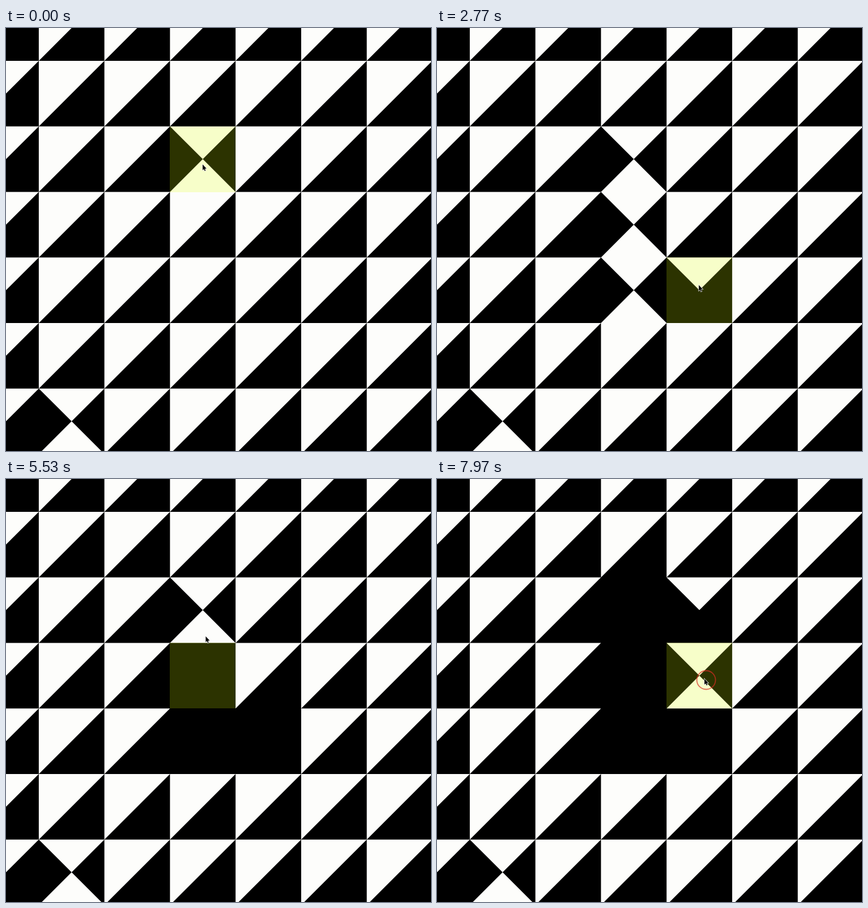
Recreate the animation shown at these times as an HTML page with a canvas. Size 750 by 747 pixels, loop 8000 ms.

```html
<!DOCTYPE html>
<html lang="en">
<head>
<meta charset="utf-8">
<title>Triangle tiles</title>
<style>
  html, body { margin: 0; width: 100%; height: 100%; overflow: hidden; background: #000; }
  canvas { display: block; }
</style>
</head>
<body>
<canvas id="stage" width="750" height="747"></canvas>
<script>
const ctx = document.getElementById('stage').getContext('2d');
const LOOP = 8000, TRAVEL = 350, RING = 160;
const SIZE = 115.75; // tile centres lie on multiples of SIZE

// The pointer leaves for each stop in turn and clicks the tile below it.
const stops = [
  { leave: -TRAVEL, x: 347, y: 241, clicks: 0 },
  { leave: 150, x: 349, y: 350, clicks: 1 },
  { leave: 750, x: 350, y: 441, clicks: 1 },
  { leave: 1400, x: 462, y: 454, clicks: 3 },
  { leave: 3230, x: 365, y: 436, clicks: 2 },
  { leave: 4270, x: 350, y: 341, clicks: 2 },
  { leave: 5330, x: 354, y: 238, clicks: 2 },
  { leave: 6240, x: 466, y: 242, clicks: 2 },
  { leave: 7400, x: 472, y: 353, clicks: 1 }
];

// Clicks are spread evenly over the stay at each stop.
const clicks = stops.flatMap((stop, i) => {
  const arrive = stop.leave + TRAVEL;
  const stay = (stops[i + 1]?.leave ?? LOOP) - arrive;
  return Array.from({ length: stop.clicks }, (_, n) => ({
    time: arrive + stay * (n + .5) / stop.clicks,
    col: Math.round(stop.x / SIZE),
    row: Math.round(stop.y / SIZE)
  }));
});

const smooth = u => u * u * (3 - 2 * u);

function pointerAt(t) {
  const i = stops.findLastIndex(stop => stop.leave <= t);
  const to = stops[i], from = stops[i - 1] ?? to;
  const s = smooth(Math.min(1, (t - to.leave) / TRAVEL));
  return [from.x + (to.x - from.x) * s, from.y + (to.y - from.y) * s];
}

function addPolygon(x, y, scale, points) {
  points.forEach(([px, py], i) =>
    ctx[i ? 'lineTo' : 'moveTo'](x + px * scale, y + py * scale));
  ctx.closePath();
}

// Each click steps a tile: corner, hourglass, top only, solid black.
function addTile(col, row, state) {
  const add = (...points) => addPolygon(col * SIZE, row * SIZE, SIZE / 2, points);
  if (state === 0) add([-1, -1], [1, -1], [-1, 1]);
  if (state === 1 || state === 2) add([-1, -1], [1, -1], [0, 0]);
  if (state === 1) add([-1, 1], [0, 0], [1, 1]);
}

function drawTiles(done) {
  ctx.fillStyle = '#000';
  ctx.fillRect(0, 0, 750, 747);
  ctx.fillStyle = '#fdfdfb';
  ctx.beginPath();
  for (let row = 0; row < 7; row++) {
    for (let col = 0; col < 7; col++) {
      const turnedBefore = (col === 1 && row === 6) || (col === 3 && row === 2);
      const count = done.filter(c => c.col === col && c.row === row).length;
      addTile(col, row, (count + turnedBefore) % 4);
    }
  }
  ctx.fill();
}

function drawRing(x, y) {
  ctx.beginPath();
  ctx.arc(x + 3, y + 2, 16.5, 0, 2 * Math.PI);
  ctx.lineWidth = 1.8;
  ctx.strokeStyle = 'rgba(215, 45, 35, .7)';
  ctx.stroke();
}

function drawPointer(x, y) {
  ctx.beginPath();
  addPolygon(x, y, 1, [[0, 0], [0, 10], [2.2, 8], [3.8, 11.5], [5.2, 10.8], [3.8, 7.4], [6.8, 7.2]]);
  ctx.lineWidth = 1.4;
  ctx.strokeStyle = '#eee';
  ctx.stroke();
  ctx.fillStyle = '#000';
  ctx.fill();
}

function draw(t) {
  const done = clicks.filter(c => c.time <= t);
  const last = done.at(-1) ?? { time: -RING, col: 3, row: 2 };
  drawTiles(done);

  const edge = n => Math.round((n - .5) * SIZE);
  ctx.fillStyle = 'rgba(220, 255, 0, .2)';
  ctx.fillRect(edge(last.col), edge(last.row), 116, 116);

  const [x, y] = pointerAt(t);
  if (t - last.time < RING) drawRing(x, y);
  drawPointer(x, y);
}

function frame() {
  draw(performance.now() % LOOP);
  requestAnimationFrame(frame);
}
frame();
</script>
</body>
</html>
```
